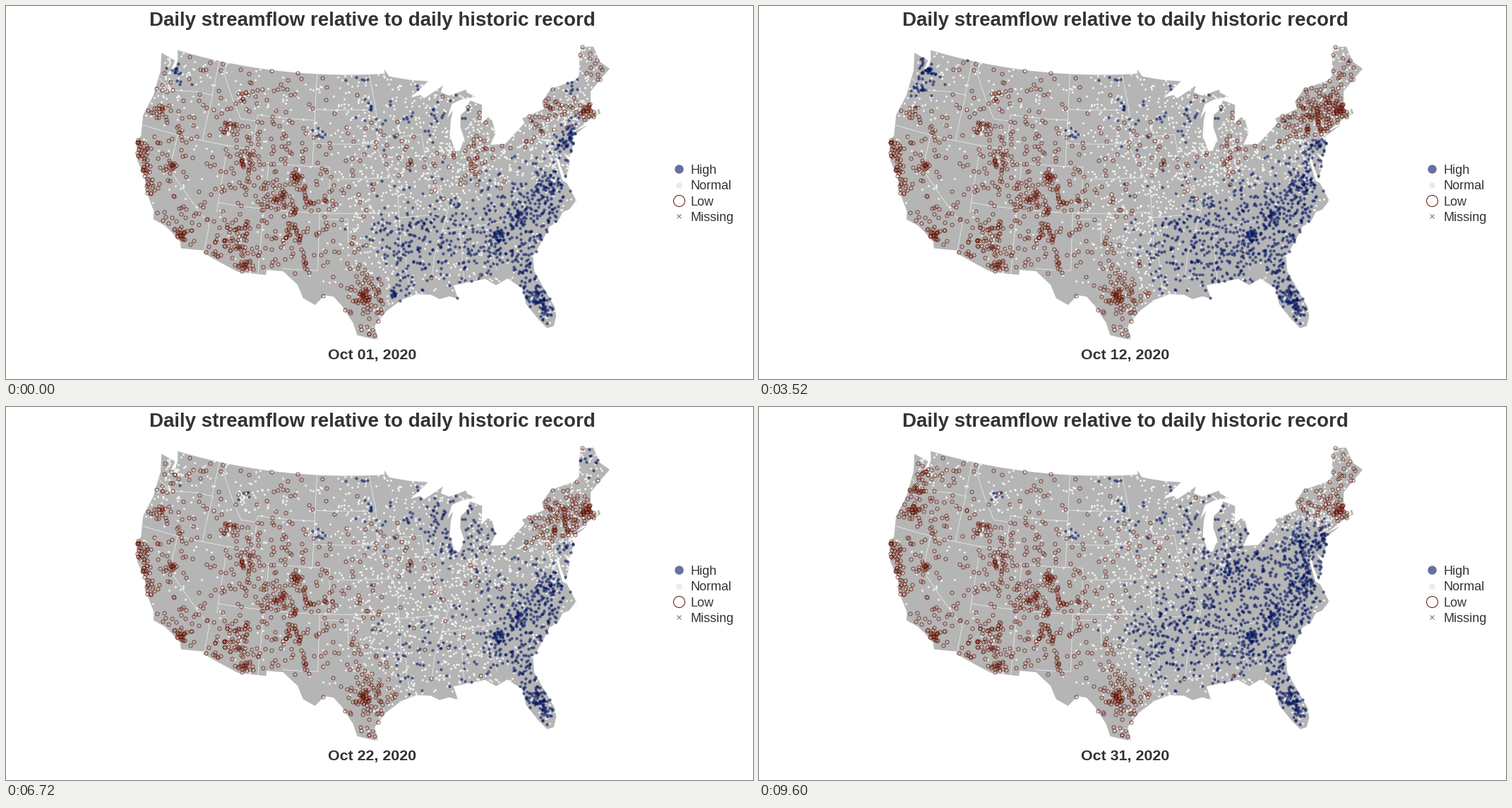
Recreate the animation shown at these times as a matplotlib script. Size 1058 by 529 pixels, loop 9920 ms.

```python
import numpy as np
import matplotlib.pyplot as plt
from matplotlib.animation import FuncAnimation
from matplotlib.path import Path

W, H, DPI = 1058, 529, 128
PT = 72 / DPI
rng = np.random.default_rng(11)
plt.rcParams["font.family"] = "Liberation Sans"


def project(lonlat):
    """Lambert azimuthal equal-area, centred on 45N 100W, in stage pixels."""
    lon, lat = np.radians(np.asarray(lonlat, float)).T
    dl, c = lon + np.radians(100), np.sqrt(0.5)
    k = np.sqrt(2 / (1 + c * np.sin(lat) + c * np.cos(lat) * np.cos(dl)))
    x = k * np.cos(lat) * np.sin(dl)
    y = k * c * (np.sin(lat) - np.cos(lat) * np.cos(dl))
    return np.column_stack([484.1 + 940 * x, 163.2 - 940 * y])


def trace(points, steps=8):
    p = np.asarray(points, float)
    t = np.linspace(0, len(p) - 1, (len(p) - 1) * steps + 1)
    i = np.arange(len(p))
    return project(np.column_stack([np.interp(t, i, p[:, 0]), np.interp(t, i, p[:, 1])]))


# Key points of the coast and border, anticlockwise from the north-west
west = [
    (-122.76, 49), (-122.4, 48.25), (-122.4, 47.6), (-122.9, 47.1), (-122.7, 48.1), (-124.7, 48.38),
    (-124.1, 46.9), (-124.05, 44.7), (-124.55, 42.84), (-124.1, 41.1), (-124.4, 40.44),
    (-123.7, 38.93), (-122.5, 37.8), (-121.9, 36.6), (-120.65, 35.15), (-120.5, 34.45),
    (-119.2, 34.15), (-118.4, 33.75), (-117.3, 33.05), (-117.12, 32.53), (-114.72, 32.72),
    (-114.8, 32.5), (-111.07, 31.33), (-108.21, 31.33), (-108.21, 31.78), (-106.53, 31.78),
    (-105, 30.68), (-104.4, 29.55), (-103.2, 29), (-102.3, 29.88), (-101.4, 29.77), (-100.6, 29),
    (-99.5, 27.5), (-99.1, 26.4), (-97.15, 25.95)]
gulf = [
    (-97.4, 27.2), (-96.3, 28.4), (-94.75, 29.35), (-93.2, 29.77), (-91.8, 29.6), (-91, 29.15),
    (-90, 29.3), (-89.2, 29), (-89.5, 30.2), (-88, 30.3), (-86.3, 30.38), (-85.3, 29.68),
    (-84.1, 30.08), (-82.8, 29), (-82.7, 27.6), (-81.8, 26.1), (-81.1, 25.15), (-80.45, 25.2)]
atlantic = [
    (-80.05, 26), (-80.03, 26.8), (-80.6, 28.3), (-81.35, 30.2), (-81.2, 31.5), (-79.9, 32.7),
    (-78.9, 33.7), (-78, 33.88), (-77.2, 34.6), (-76.5, 34.65), (-75.53, 35.23), (-76, 36.9),
    (-76.4, 37.2), (-76.45, 39.1), (-76.1, 39.4), (-76.2, 38.5), (-76, 37.2), (-75.05, 38.6),
    (-75.5, 39.5), (-74.9, 38.95), (-74.05, 40), (-74, 40.55), (-71.9, 41.07), (-73.6, 40.9),
    (-71.4, 41.45), (-70, 41.6), (-70, 42.05), (-70.5, 41.8), (-71, 42.35), (-70.6, 42.9),
    (-70.2, 43.65), (-68.5, 44.3), (-67, 44.8), (-67.8, 45.7), (-67.8, 47.07), (-69.25, 47.45),
    (-70, 46.7), (-70.85, 45.25), (-71.5, 45.01), (-74.7, 45)]
lakes = [
    (-76.2, 44.2), (-76.2, 43.55), (-79.05, 43.27), (-78.9, 42.85), (-81.7, 41.5), (-83.4, 41.7),
    (-82.5, 42.6), (-82.6, 43.8), (-83, 44.07), (-83.9, 43.65), (-83.4, 45.2), (-84.75, 45.78),
    (-85.5, 45), (-86.2, 44.7), (-86.5, 43.7), (-86.25, 42.6), (-87, 41.67), (-87.5, 41.7),
    (-87.9, 43.1), (-87.5, 44.4), (-87.05, 45.2), (-87.9, 44.6), (-87.05, 45.75), (-85.8, 46),
    (-84, 46), (-84.95, 46.5), (-85, 46.77), (-87.2, 46.5), (-88.2, 46.9), (-87.8, 47.45),
    (-90.4, 46.57), (-90.8, 46.9), (-92.1, 46.75), (-89.6, 48), (-92, 48.3), (-94.6, 48.75),
    (-95.15, 49.38), (-95.15, 49), (-109, 49), (-122.76, 49)]
land = trace(west + gulf + atlantic + lakes)

# State lines: (lon, lat, lat), (lat, lon, lon) and bent ones
meridians = [
    (-117.03, 49, 46), (-117.03, 44, 42), (-111.05, 45, 41), (-104.05, 49, 41), (-102.05, 41, 37),
    (-109.05, 41, 31.33), (-114.05, 42, 36.2), (-103.03, 37, 32), (-100, 36.5, 34.56), (-94.5, 39, 33)]
parallels = [
    (42, -124.2, -111.05), (45, -111.05, -104.05), (45.94, -104.05, -96.56), (43, -104.05, -96.5),
    (41, -111.05, -102.05), (40, -102.05, -95.3), (37, -114.05, -94.6), (36.5, -103, -100),
    (32, -106.62, -103.06), (43.5, -96.45, -91.2), (36.5, -94.6, -90.2), (35, -90.1, -83.1)]
bent = [
    [(-124, 46.25), (-122.3, 45.55), (-119, 46), (-116.92, 46), (-117.03, 44)],
    [(-116.05, 49), (-116.05, 48), (-114.4, 46), (-113, 44.45), (-111.05, 44.47)],
    [(-120, 42), (-120, 39), (-114.63, 35), (-114.72, 32.72)],
    [(-100, 34.56), (-96, 33.8), (-94.04, 33), (-94.04, 31.5), (-93.8, 29.8)],
    [(-97.2, 49), (-96.5, 46), (-96.5, 42.5), (-94.6, 39.1)],
    [(-91.2, 43.5), (-91, 41), (-89.1, 36.95), (-91.1, 33), (-91.6, 31), (-89.7, 31)],
    [(-88.2, 35), (-88.4, 30.4)], [(-85.6, 35), (-85, 31)]]


def bump(x, y, cx, cy, r):
    return np.exp(-((x - cx) ** 2 + (y - cy) ** 2) / r ** 2)


def ramp(v, width):
    return 1 / (1 + np.exp(-v / width))


def share(x, y):
    """How much of the even spread of gauges is kept at a place."""
    s = 0.36 + 0.6 * ramp(x - 492, 8)
    for cx, cy, r in [(265, 215, 55), (420, 390, 60), (540, 115, 55), (620, 420, 45), (480, 450, 45)]:
        s = s * (1 - 0.7 * bump(x, y, cx, cy, r))
    return s


# Dense spots of gauges (x, y, radius) and rivers strung with them
spots = [
    (238, 88, 9), (221, 115, 9), (218, 148, 7), (193, 205, 9), (195, 232, 5), (202, 255, 7),
    (247, 323, 6), (233, 229, 5), (325, 332, 12), (335, 370, 6), (340, 221, 8), (388, 272, 10),
    (410, 246, 6), (336, 125, 5), (315, 171, 6), (442, 178, 5), (508, 412, 10), (548, 408, 3),
    (698, 325, 7), (725, 293, 10), (748, 410, 8), (766, 430, 9), (823, 148, 7), (796, 188, 8),
    (765, 180, 17), (770, 250, 14), (660, 222, 10), (607, 260, 3), (632, 203, 4), (800, 150, 14)]
rivers = [
    [(411, 288), (400, 315), (390, 342)], [(407, 305), (419, 345), (427, 375)],
    [(422, 255), (424, 278), (460, 276)], [(508, 104), (516, 140), (506, 195)]]

parts = []
even = rng.uniform((184, 54), (856, 474), (7200, 2))
parts.append(even[rng.random(len(even)) < share(*even.T)])
for x, y, r in spots:
    parts.append(rng.normal((x, y), 0.9 * r, (int(4 * r), 2)))
for river in rivers:
    t = rng.uniform(0, 2, 24)
    line = np.column_stack([np.interp(t, range(3), axis) for axis in np.transpose(river)])
    parts.append(line + rng.normal(0, 1.4, line.shape))
gauges = np.vstack(parts)
gauges = gauges[Path(land).contains_points(gauges)]
gx, gy = gauges.T

# Lasting wet (+) and dry (-) areas: x, y, radius, strength
climate = [
    (715, 320, 70, 0.95), (768, 265, 36, 0.6), (752, 410, 32, 0.8), (600, 350, 55, 0.4),
    (443, 178, 14, 1.0), (515, 125, 35, 0.35), (608, 160, 34, 0.4), (795, 200, 15, 0.6),
    (785, 155, 42, -0.6), (828, 145, 16, -0.6), (835, 90, 28, -0.5), (512, 412, 38, -0.75),
    (560, 212, 26, -0.35), (655, 215, 36, -0.4), (390, 180, 35, 0.25), (260, 250, 35, 0.3)]
# Passing weather: x, y, radius, day of peak, days it lasts, strength
weather = [
    (230, 100, 38, 13.5, 3, 1.3), (245, 85, 25, 1, 3, 0.5), (215, 130, 45, 31, 4, -0.6),
    (336, 125, 24, 27, 9, 0.8), (797, 180, 28, 1, 3, 1.0), (805, 115, 22, 1, 3, 0.9),
    (790, 205, 26, 14, 3, 1.2), (785, 195, 38, 31, 2.5, 1.3), (690, 240, 70, 31, 2.5, 1.1),
    (570, 315, 50, 31, 3, 0.7), (650, 185, 50, 24, 3.5, 0.95), (560, 335, 55, 1, 4, 0.6),
    (550, 407, 12, 1, 3, 1.2), (650, 350, 85, 12, 3, 0.5), (832, 85, 32, 19, 4.5, 1.1),
    (790, 145, 50, 9, 4, -0.4), (720, 310, 90, 7, 3, -0.35), (650, 345, 60, 22, 4, -0.35)]

base = -0.75 * ramp(475 - gx, 20) * (0.25 + 0.75 * ramp(gy - 150, 20))
base += rng.normal(0, 0.3, len(gauges))
for x, y, r, s in climate:
    base += s * bump(gx, gy, x, y, r)
reach = [bump(gx, gy, x, y, r) for x, y, r, *_ in weather]


def wetness(day):
    wet = base.copy()
    for area, (_, _, _, peak, span, s) in zip(reach, weather):
        wet += s * area * np.exp(-((day - peak) / span) ** 2)
    return wet


fig = plt.figure(figsize=(W / DPI, H / DPI), dpi=DPI, facecolor="white")
ax = fig.add_axes([0, 0, 1, 1])
ax.set(xlim=(0, W), ylim=(H, 0))
ax.axis("off")
ax.fill(*land.T, color="#b5b5b5", lw=0)

borders = [[(lon, a), (lon, b)] for lon, a, b in meridians]
borders += [[(a, lat), (b, lat)] for lat, a, b in parallels]
for line in borders + bent:
    ax.plot(*trace(line).T, color="white", lw=0.7 * PT, alpha=0.85)

INK, BLUE, PALE, RED = "#333336", "#00125f", "#efefed", "#641000"


def dots(size, face, edge="none", width=0.0, alpha=None, x=(), y=(), marker="o"):
    return ax.plot(x, y, marker, ms=size * PT, mfc=face, mec=edge,
                   mew=width * PT, alpha=alpha)[0]


def label(x, y, text, px, **kw):
    return ax.text(x, y, text, fontsize=px * PT, color=INK, va="baseline", **kw)


normal = dots(3, PALE)
high = dots(4.3, BLUE, alpha=0.6)
low = dots(5.2, "none", RED, 0.75, 0.9)

dots(12.5, BLUE, alpha=0.6, x=[953], y=[231])
dots(8.5, "#ebebeb", x=[953], y=[253.5])
dots(16, "none", RED, 1, x=[953], y=[275.5])
dots(6, "none", "#707070", 1, x=[953], y=[298], marker="x")
for i, name in enumerate(["High", "Normal", "Low", "Missing"]):
    label(969.5, 238 + 22.4 * i, name, 18)
label(519, 28.5, "Daily streamflow relative to daily historic record", 27.7, ha="center", weight="bold")
date = label(519, 501.5, "", 21.4, ha="center", weight="bold")


def update(i):
    day = i + 1
    wet = wetness(day)
    is_high, is_low = wet > 0.42, wet < -0.42
    for art, mask in ((high, is_high), (low, is_low), (normal, ~(is_high | is_low))):
        art.set_data(gx[mask], gy[mask])
    date.set_text(f"Oct {day:02d}, 2020")
    return high, low, normal, date


anim = FuncAnimation(fig, update, frames=31, interval=320, repeat=True, repeat_delay=0, blit=False)
plt.show()
```
